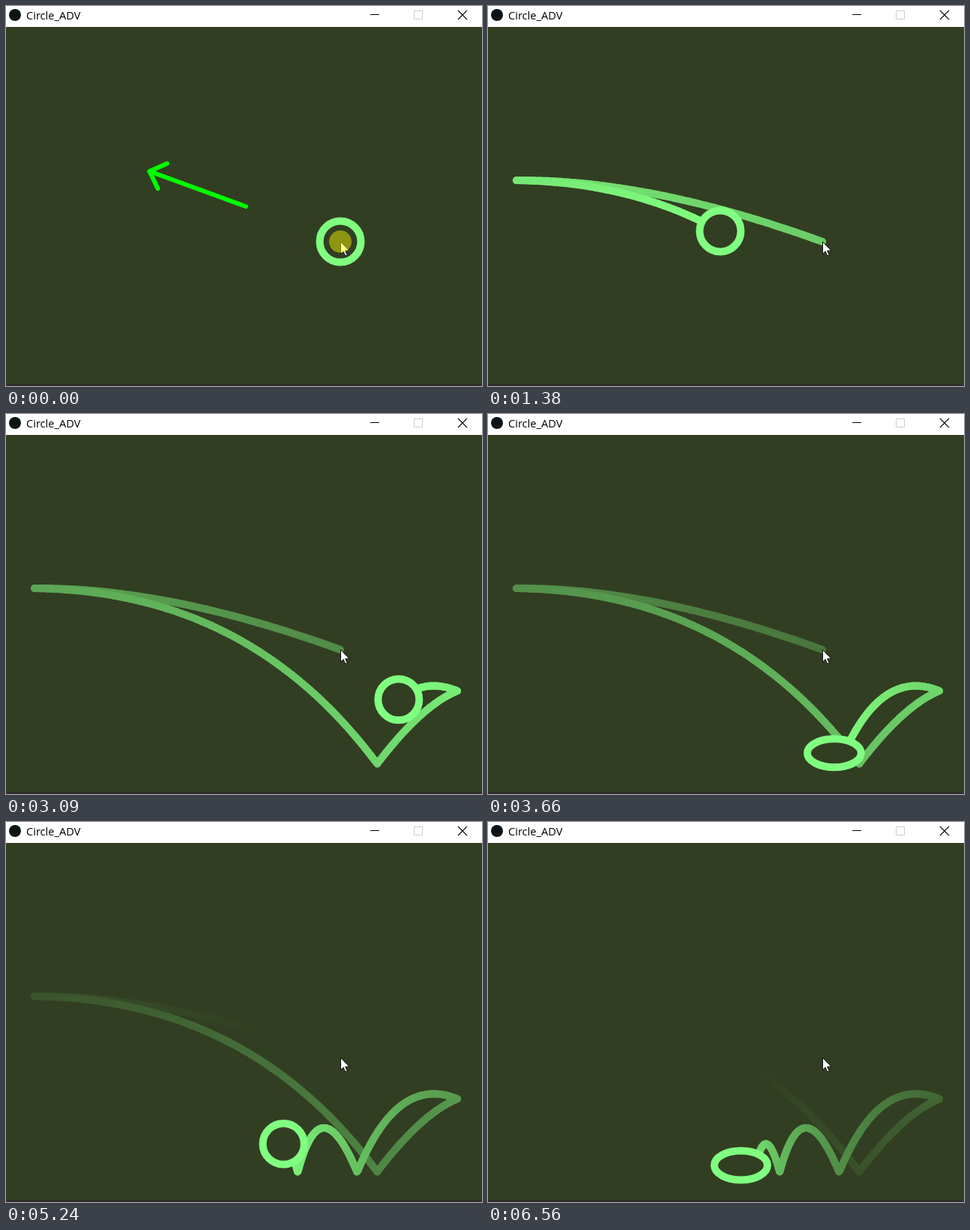
An HTML page with a canvas for the animation above (6610 ms loop, 635 by 508 pixels).

```html
<!DOCTYPE html>
<html lang="en">
<head>
<meta charset="utf-8">
<title>Circle_ADV</title>
<style>
  html, body { margin: 0; width: 100%; height: 100%; overflow: hidden; background: #fff; }
  canvas { display: block; }
</style>
</head>
<body>
<canvas id="stage" width="635" height="508"></canvas>
<script>
const ctx = document.getElementById('stage').getContext('2d');

// Times in ms: launch of the ball, picture interval, physics tick
const LOOP = 6610, LAUNCH = 98, SHOT = 47.48, TICK = 17.03, ORIGIN = 74;
const GRAVITY = 0.1, DRAG = 0.99, LEFT = 38, RIGHT = 602, FLOOR = 467.5;
const START = { x: 446, y: 315 }, CENTER = { x: 318, y: 268 };
const FADE = 295, SQUASH = 0.31, SQUASH_PEAK = 3.5;
const BG = [50, 62, 34], GREEN = [128, 255, 128];

const rgb = c => `rgb(${c.map(Math.round).join()})`;
const mix = (a, b, k) => a.map((v, i) => v + (b[i] - v) * k);

// Slingshot throw with drag and elastic bounces; each state remembers its last hit
function simulate(ticks) {
  let { x, y } = START;
  let vx = (CENTER.x - x) / 10, vy = (CENTER.y - y) / 10;
  let hit = null, side = 0;
  const states = [{ x, y, hit, side }];
  for (let n = 1; n <= ticks; n++) {
    vx *= DRAG;
    vy = vy * DRAG + GRAVITY;
    x += vx;
    y += vy;
    if (x < LEFT || x > RIGHT) {
      x = x < LEFT ? LEFT : RIGHT;
      vx = -vx;
      hit = n;
      side = -1;
    }
    if (y > FLOOR) {
      y = FLOOR;
      vy = -vy;
      hit = n;
      side = 1;
    }
    states.push({ x, y, hit, side });
  }
  return states;
}

const states = simulate(Math.ceil(LOOP / TICK));

// Positive widens the ball (floor), negative makes it taller (walls)
function squash(n) {
  const { hit, side } = states[n];
  if (hit === null) return 0;
  const s = (n - hit) / SQUASH_PEAK;
  return side * SQUASH * s * Math.exp(1 - s);
}

function path(points, close) {
  ctx.beginPath();
  points.forEach(([x, y], i) => i ? ctx.lineTo(x, y) : ctx.moveTo(x, y));
  if (close) ctx.closePath();
}

function stroke(points, color, width) {
  path(points);
  ctx.strokeStyle = color;
  ctx.lineWidth = width;
  ctx.stroke();
}

function disc(x, y, r, color) {
  ctx.beginPath();
  ctx.arc(x, y, r, 0, Math.PI * 2);
  ctx.fillStyle = color;
  ctx.fill();
}

function drawWindow() {
  ctx.fillStyle = '#fff';
  ctx.fillRect(0, 0, 635, 28);
  ctx.fillStyle = rgb(BG);
  ctx.fillRect(0, 28, 635, 480);
  ctx.fillStyle = '#332f2a';
  ctx.fillRect(0, 505, 635, 3);

  disc(12, 12, 8, '#0c1418');
  ctx.fillStyle = '#000';
  ctx.font = '14.6px "Open Sans", "Noto Sans", sans-serif';
  ctx.fillText('Circle_ADV', 27, 18);

  ctx.lineCap = 'butt';
  stroke([[486, 11.5], [498, 11.5]], '#000', 1);
  ctx.strokeStyle = '#ccc';
  ctx.strokeRect(544.5, 6.5, 11, 11);
  stroke([[603, 6], [615, 18]], '#000', 1.1);
  stroke([[615, 6], [603, 18]], '#000', 1.1);
  ctx.lineCap = ctx.lineJoin = 'round';
}

function drawTrail(n) {
  for (let i = Math.max(1, n - FADE); i <= n; i++) {
    const a = states[i - 1], b = states[i];
    stroke([[a.x, a.y], [b.x, b.y]], rgb(mix(BG, GREEN, 1 - (n - i) / FADE)), 10);
  }
}

function drawBall(n) {
  const { x, y } = states[n];
  const q = squash(n);
  ctx.beginPath();
  ctx.ellipse(x, y, 27.5 * (1 + q), 27.5 * (1 - q), 0, 0, Math.PI * 2);
  ctx.fillStyle = rgb(BG);
  ctx.fill();
  ctx.strokeStyle = rgb(GREEN);
  ctx.lineWidth = 10;
  ctx.stroke();
}

function drawArrow() {
  const tip = [191.5, 221];
  stroke([[320, 268], tip], '#0f0', 6);
  stroke([[215, 210.5], tip, [202.5, 244]], '#0f0', 6);
}

function drawCursor() {
  path([[446.5, 315.5], [446.5, 331.5], [450, 328], [452.8, 334],
        [455.2, 333], [452.6, 327.2], [457.6, 327]], true);
  ctx.fillStyle = '#fff';
  ctx.fill();
  ctx.strokeStyle = '#111';
  ctx.lineWidth = 1;
  ctx.stroke();
}

function draw(time) {
  const t = time % LOOP;
  drawWindow();
  if (t < LAUNCH) {
    drawBall(0);
    drawArrow();
    drawCursor();
    disc(START.x, START.y, 15, 'rgba(255,255,0,.45)');
    return;
  }
  const shown = LAUNCH + Math.floor((t - LAUNCH) / SHOT) * SHOT;
  const n = Math.round((shown - ORIGIN) / TICK);
  drawTrail(n);
  drawBall(n);
  drawCursor();
}

let start = null;
function tick(now) {
  if (start === null) start = now;
  draw(Math.max(0, now - start));
  requestAnimationFrame(tick);
}
draw(0);
requestAnimationFrame(tick);
</script>
</body>
</html>
```
